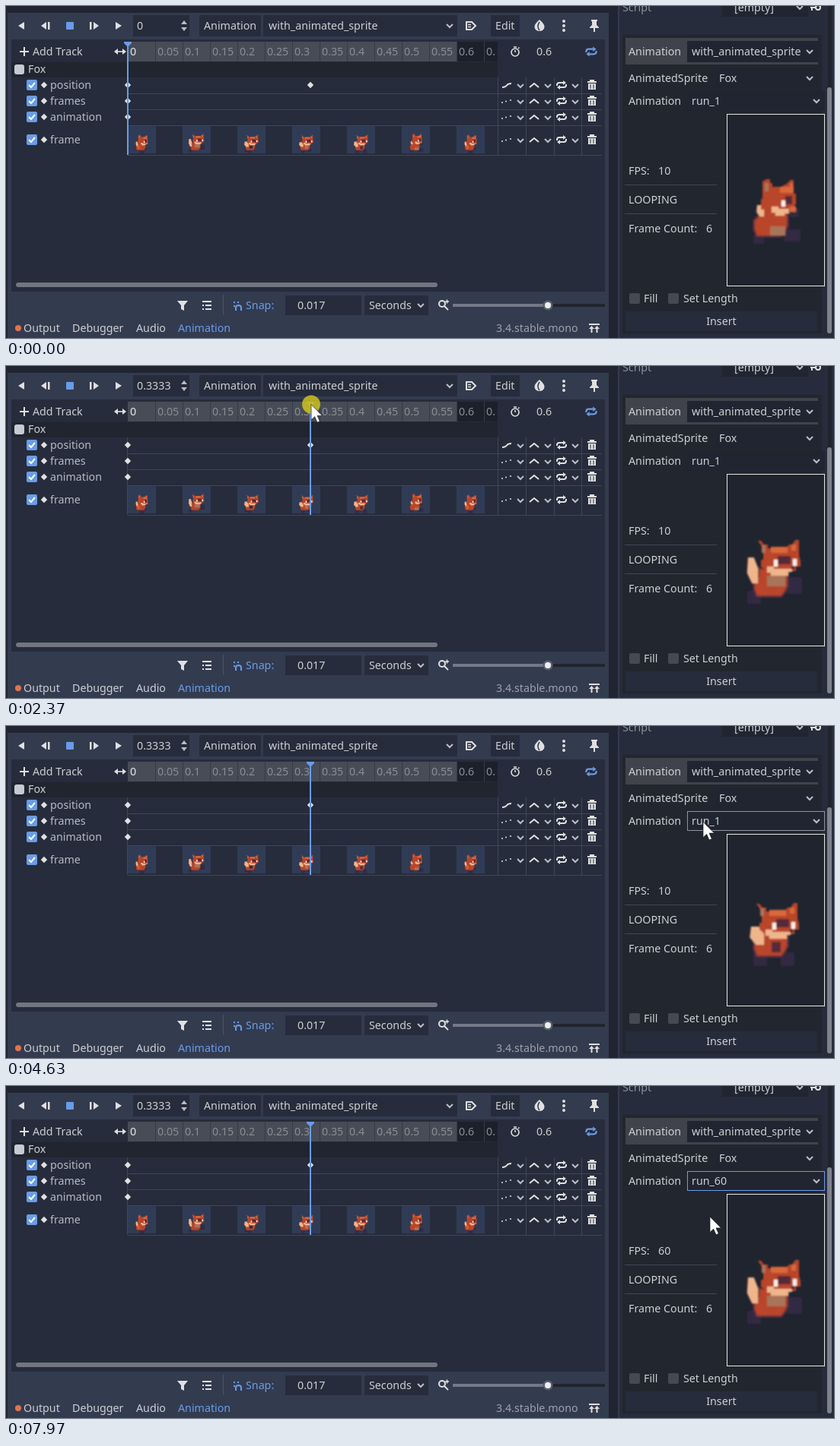
An HTML page that plays this animation: 1088 px wide and 437 px high, repeating every 7990 ms.

```html
<!DOCTYPE html>
<html lang="en">
<head>
<meta charset="utf-8">
<title>Animation editor</title>
<style>
  html, body { margin: 0; width: 100%; height: 100%; overflow: hidden; background: #202531; }
  svg { display: block; }
  text { font: 14.25px "Noto Sans", "Open Sans", sans-serif; white-space: pre; }
</style>
</head>
<body>
<svg id="stage" width="1088" height="437" viewBox="0 0 1088 437"></svg>
<script>
const LOOP = 7990;
const BASE = '#333b4f', DARK = '#262c3b', DARKER = '#202531', LINE = '#3f4656';
const ICON = '#e0e0e0', TEXT = '#cdcfd2', DIM = '#8d929d', BLUE = '#699ce8';

const rect = (x, y, w, h, fill, extra = '') =>
  `<rect x="${x}" y="${y}" width="${w}" height="${h}" fill="${fill}" ${extra}/>`;
const text = (x, y, s, fill = TEXT, extra = '') => `<text x="${x}" y="${y}" fill="${fill}" ${extra}>${s}</text>`;
const shape = (d, fill = ICON) => `<path d="${d}" fill="${fill}"/>`;
const stroke = (d, color = ICON, width = 2) =>
  `<path d="${d}" fill="none" stroke="${color}" stroke-width="${width}"/>`;
const dot = (x, y, r, fill = ICON) => `<circle cx="${x}" cy="${y}" r="${r}" fill="${fill}"/>`;
const group = (id, content, extra = '') => `<g id="${id}" ${extra}>${content}</g>`;
const chevron = (x, y, color = '#b9bdc6') => stroke(`M${x - 4},${y - 2}l4,4l4,-4`, color);
const diamond = (x, y, r = 4.2) => shape(`M${x - r},${y}l${r},${-r}l${r},${r}l${-r},${r}z`);
const loopIcon = (x, y, color, s = 1) => `<g transform="translate(${x} ${y}) scale(${s})">` +
  stroke('M-6,1v-1q0,-3 3,-3h5M6,-1v1q0,3 -3,3h-5', color) +
  shape('M2,-6l4,3l-4,3zM-2,6l-4,-3l4,-3z', color) + '</g>';

function toolbar() {
  let s = rect(2, 9, 790, 428, BASE);
  s += shape('M24,21v10l-8,-5z') + shape('M53,21v10l-7,-5z') + rect(55, 21, 2.5, 10, ICON);
  s += rect(79, 21, 10, 10, BLUE, 'rx="1"');
  s += rect(110, 21, 2.5, 10, ICON) + shape('M115,21v10l7,-5z') + shape('M144,21v10l8,-5z');
  s += rect(167, 12, 74, 28, DARK) + shape('M230,24l4,-5l4,5zM230,28l4,5l4,-5z', '#b9bdc6');
  s += rect(254, 12, 81, 28, DARK) + text(260, 31, 'Animation');
  s += rect(338, 12, 255, 28, DARK) + text(345, 31, 'with_animated_sprite') + chevron(583, 26);
  s += stroke('M605,21h7l5,5l-5,5h-7z') + stroke('M607,24.5h4M607,27.5h4', ICON, 1.4);
  s += rect(637, 12, 38, 28, DARK) + text(643, 31, 'Edit');
  s += shape('M701,18q7,6 6.5,10q-1,5 -6.5,5q-5.500,0 -6.500,-5q-.5,-4 6.500,-10z') +
       stroke('M701,21q-4,6 0,11', BASE, 1.5);
  s += [20, 26, 32].map(y => dot(733, y, 2)).join('');
  s += shape('M769,18h8v2h-1v5l3,3v1h-5v5h-2v-5h-5v-1l3,-3v-5h-1z');
  return s;
}

function ruler() {
  let s = rect(7, 44, 780, 332, DARK) + rect(160, 47, 432, 26, '#484c57') + rect(592, 47, 54, 26, '#1c202a');
  s += stroke('M18,60h12M24,54v12') + text(35, 65, 'Add Track');
  s += stroke('M144,60h12', ICON, 1.6) + shape('M142,60l5,-4v8zM158,60l-5,-4v8z');
  for (let i = 0; i < 14; i++) {
    const x = 160 + 36 * i;
    if (i) s += rect(x, 47, 1, 26, '#363b47');
    const label = i === 13 ? '0.' : String(+(i * 0.05).toFixed(2));
    s += text(x + 3, 65, label, i ? '#898d95' : '#e6e7e9');
  }
  s += '<circle cx="669" cy="61" r="5" fill="none" stroke="#e0e0e0" stroke-width="1.6"/>' +
       stroke('M669,61v-3M667,54h4M673,56l1.500,-1.500', ICON, 1.5);
  return s + text(697, 65, '0.6') + loopIcon(769, 60, BLUE, 1.1);
}

function trash(y) {
  return rect(764, y - 5, 12, 2, ICON) + rect(767, y - 7, 6, 2, ICON) +
    shape(`M765,${y - 2}h10v8h-10z`) + stroke(`M768,${y - 1}v6M772,${y - 1}v6`, DARK, 1);
}

function tracks() {
  let s = rect(7, 74, 639, 20, '#20252f') + rect(11, 77, 13, 13, '#c6cad2', 'rx="3"') + text(29, 88, 'Fox');
  s += [115, 136, 157, 196].map(y => rect(160, y, 623, 1, LINE)).join('');
  s += [646, 683, 720, 756].map(x => rect(x, 94, 1, 102, LINE)).join('');
  s += rect(159, 94, 1, 102, LINE);
  ['position', 'frames', 'animation', 'frame'].forEach((name, i) => {
    const y = [104, 125, 146, 176][i];
    s += rect(27, y - 7, 14, 14, BLUE, 'rx="2"') + stroke(`M30,${y}l3,3l5,-6`, '#fff');
    s += diamond(50, y) + text(58, y + 5, name, '#b6bac2');
    s += i ? [652, 657, 663].map((x, k) => dot(x, y + 2 - k * 1.5, 1)).join('')
           : stroke(`M652,${y + 3}q4,0 6,-2.500t6,-2.500`);
    s += stroke(`M688,${y + 3}l6,-5l6,5`) + loopIcon(730, y, ICON);
    s += [676, 712, 748].map(x => chevron(x, y + 1)).join('') + trash(y);
    if (i < 3) s += diamond(160, y);
  });
  s += diamond(400, 104);
  for (let i = 0; i < 7; i++) {
    const x = 160 + 72 * i;
    s += rect(x, 158, 37, 36, '#303c55') +
      `<use href="#fox${(i + 5) % 6}" transform="translate(${x + 7} 167) scale(.29)"/>`;
  }
  return s + rect(13, 364, 554, 6, '#707580', 'rx="3"');
}

function footer() {
  let s = shape('M225,388h14l-5,6v7l-4,-2v-5z');
  s += stroke('M258,389h12M262,394h8M262,399h8') + stroke('M258,394h2M258,399h2');
  s += rect(285, 380, 1, 27, '#4b5263');
  s += stroke('M302,401v-4q0,-3 3.500,-3t3.500,3v4', BLUE) +
       [[300, 390], [305, 390], [300, 395]].map(p => dot(...p, 1.2, BLUE)).join('');
  s += text(315, 399, 'Snap:', BLUE) + rect(367, 381, 100, 26, DARK) + text(383, 399, '0.017');
  s += rect(471, 381, 84, 26, DARK) + text(477, 399, 'Seconds') + chevron(545, 394);
  s += '<circle cx="573" cy="392" r="4" fill="none" stroke="#e0e0e0" stroke-width="2"/>' +
       stroke('M576,395l5,5') + stroke('M577,389h5M579.500,386.500v5', ICON, 1.5);
  s += rect(587, 392, 125, 4, '#737986') + rect(712, 392, 75, 4, '#20252f');
  s += dot(712, 394, 6.5, '#59606f') + dot(712, 394, 4, '#f0f0f0');
  s += dot(16, 424, 4, '#e0734a') + text(23, 429, 'Output') + text(87, 429, 'Debugger');
  s += text(171, 429, 'Audio') + text(226, 429, 'Animation', BLUE) + text(644, 429, '3.4.stable.mono', '#9da1aa');
  return s + stroke('M766,419h14M769.500,430v-7M776.500,430v-7') + shape('M766,425l3.500,-4l3.500,4zM773,425l3.500,-4l3.500,4z');
}

function inspector() {
  let s = rect(804, 0, 284, 437, DARK) + rect(804, 0, 2, 437, BASE);
  s += text(810, 7, 'Script', DIM) + rect(941, 0, 113, 14, DARKER) + text(957, 7, '[empty]') + chevron(1043, 2);
  s += '<circle cx="1067" cy="2" r="3" fill="none" stroke="#e0e0e0" stroke-width="2"/>' + stroke('M1057,2h7M1059,2v4');
  s += rect(810, 38, 262, 393, '#22262f');
  s += rect(814, 42, 253, 35, '#40434c') + rect(895, 46, 172, 28, DARKER);
  s += text(818, 65, 'Animation') + text(901, 65, 'with_animated_sprite') + chevron(1056, 60);
  s += text(818, 100, 'AnimatedSprite') + rect(932, 82, 135, 26, DARKER) + text(937, 100, 'Fox') + chevron(1056, 95);
  s += text(818, 130, 'Animation') + rect(895, 112, 181, 26, DARKER);
  s += text(818, 222, 'FPS:') + rect(813, 235, 121, 1, LINE) + text(818, 260, 'LOOPING');
  s += rect(813, 273, 121, 1, LINE) + text(818, 298, 'Frame Count:') + text(920, 298, '6');
  s += [[819, 838, 'Fill'], [870, 890, 'Set Length']].map(([x, tx, label]) =>
    rect(x, 378, 14, 14, '#454952', 'rx="2"') + text(tx, 390, label)).join('');
  s += rect(814, 402, 252, 26, DARK) + text(940, 420, 'Insert', TEXT, 'text-anchor="middle"');
  s += rect(1080, 0, 5, 431, '#20242e') + rect(1079, 107, 6, 324, '#7d828c', 'rx="3"');
  return s + rect(947.5, 142.5, 128, 226, '#20242f', 'stroke="#e8e8e0"');
}

// Fox: side or front head, tail, belly and legs, varied per pose.
const RED = '#b9452b', ORANGE = '#d9673a', CREAM = '#efb68c', TAN = '#a9745a', SHADE = '#322b43', MAROON = '#572a38';
function frontHead() {
  return shape('M18,6h4l4,5h5v5h24l4,-5h4l4,-6h5v20l2,8v7h-6v6h-38l-8,-6v-9h3v-15z', RED) +
    rect(23, 12, 5, 10, TAN) + rect(35, 14, 22, 8, ORANGE) + rect(62, 11, 6, 8, ORANGE) +
    rect(44, 26, 17, 11, MAROON) + rect(39, 31, 5, 9, '#fff3e8') + rect(64, 30, 5, 9, '#fff3e8') +
    shape('M30,40h9v3h24v4h-5v5h-23v-4h-5z', CREAM) + rect(62, 39, 4, 5, MAROON);
}
function sideHead() {
  return shape('M24,7l5,-3h5v5h3v5h11l8,-4l5,-5h4v18h3v13l-4,8h-42v-14h2z', RED) +
    rect(27, 9, 5, 11, TAN) + rect(47, 14, 18, 8, ORANGE) + rect(60, 9, 4, 12, ORANGE) +
    rect(54, 26, 9, 11, MAROON) + rect(49, 32, 5, 8, '#fff3e8') +
    shape('M36,40h9v3h14v6h-6v3h-12v-4h-5z', CREAM) + rect(60, 40, 8, 7, ORANGE);
}
function fox({ front, x = 0, y = 0, tail, belly, legs }) {
  const body = 'M18,42h40v24l-4,8l-5,6h-33l-4,-10v-12l6,-6z';
  const [tx, ty, tw, th] = tail;
  const head = `<g transform="translate(${x} ${y})">${front ? frontHead() : sideHead()}</g>`;
  return legs.map(([lx, ly, w, h]) => rect(lx, ly, w, h, SHADE, 'rx="3"')).join('') +
    `<path d="${body}" fill="${RED}" stroke="${SHADE}" stroke-width="4" stroke-opacity=".55"/>` +
    shape(`M${tx},${ty}h${tw * .6}l${tw * .4},${th * .4}v${th * .6}h${-tw * .6}l${-tw * .5},${-th * .4}z`, CREAM) +
    rect(...belly) + head;
}
const poses = [
  { front: true, tail: [5, 28, 13, 34], belly: [30, 52, 24, 14, TAN], legs: [[4, 72, 18, 17], [56, 54, 20, 22]] },
  { front: true, x: -2, y: 4, tail: [9, 40, 18, 24], belly: [31, 58, 14, 13, SHADE], legs: [[8, 70, 18, 16], [24, 78, 16, 13]] },
  { front: true, x: -2, y: 5, tail: [9, 42, 17, 22], belly: [34, 58, 14, 14, TAN], legs: [[18, 76, 16, 15], [44, 72, 18, 15]] },
  { front: true, x: -2, y: 4, tail: [9, 40, 17, 24], belly: [36, 60, 12, 14, MAROON], legs: [[12, 74, 18, 18], [48, 74, 18, 18]] },
  { front: false, tail: [17, 38, 9, 15], belly: [34, 66, 20, 12, TAN], legs: [[12, 76, 14, 13], [52, 70, 22, 16], [60, 42, 12, 12]] },
  { front: false, x: -1, y: 5, tail: [13, 40, 9, 20], belly: [22, 58, 7, 15, ORANGE], legs: [[28, 76, 22, 17], [48, 66, 14, 12]] }
];

const popup = rect(895.5, 138.500, 180, 56, BASE, 'stroke="#4a6590"') +
  rect(899, 144, 173, 23, '#252b38', 'id="hover"') +
  dot(911, 155, 6.5, '#dfe6f2') + dot(911, 155, 3, BLUE) + dot(911, 178, 6.5, '#525866') +
  text(923, 160, 'run_1') + text(923, 183, 'run_60');
const pointer = '<path d="M0,0v20.500l4.700,-4.300l3.300,7.600l3.400,-1.500l-3.300,-7.400h6.500z" fill="#fff" stroke="#15181f" stroke-width=".7"/>';

document.getElementById('stage').innerHTML =
  '<defs>' + poses.map((p, i) => group('fox' + i, fox(p))).join('') +
  '<filter id="soft"><feGaussianBlur stdDeviation=".9"/></filter></defs>' +
  rect(0, 0, 1088, 437, DARKER) + toolbar() + ruler() + tracks() + footer() + inspector() +
  text(172, 31, '0', TEXT, 'id="time"') +
  group('playhead', rect(-1, 47, 2, 149, BLUE) + shape('M-5,47h10v2l-4,4h-2l-4,-4z', BLUE)) +
  '<use id="fox" transform="translate(970 224)" filter="url(#soft)"/>' +
  rect(895.5, 112.5, 180, 25, 'none', 'id="focus"') + text(901, 130, 'run_1', TEXT, 'id="choice"') +
  group('arrow', chevron(1065, 125)) + text(857, 222, '10', TEXT, 'id="fps"') +
  group('popup', popup) +
  group('cursor', group('press', dot(0, 0, 12, '#c8bd20'), 'opacity=".88"') + pointer);

const SEEK = 2260, HOVER = 4185, OPEN = 5450, CLOSE = 7440;
const presses = [[SEEK, 2470], [5400, 5560], [7240, CLOSE]];
// time, x, y
const path = [
  [60, 402, 445], [450, 335, 250], [850, 281, 106], [1150, 225, 80], [1420, 201.5, 65], [1640, 262, 53],
  [1820, 350, 51], [2050, 401, 50.5], [2900, 401, 50.5], [3340, 633, 63], [3440, 634, 64], [3860, 816, 86],
  [4230, 908, 125], [4400, 916, 126], [5860, 916, 127], [6120, 916, 150], [6240, 916, 150], [6580, 925, 172]
];
function cursorAt(t) {
  const next = path.findIndex(p => p[0] > t);
  if (next < 1) return path[next < 0 ? path.length - 1 : 0].slice(1);
  const [a, b] = [path[next - 1], path[next]];
  const k = (t - a[0]) / (b[0] - a[0]);
  return [a[1] + (b[1] - a[1]) * k, a[2] + (b[2] - a[2]) * k];
}
function poseAt(t) {
  const step = t < SEEK ? 5 + Math.floor((t - 60) / 115)
    : t < CLOSE ? Math.floor((t - 2365) / 107.6) : Math.floor((t - 7965) / 22.5);
  return ((step % 6) + 6) % 6;
}

const $ = id => document.getElementById(id);
const set = (id, name, value) => $(id).setAttribute(name, value);
const show = (id, visible) => set(id, 'visibility', visible ? 'visible' : 'hidden');
const label = (id, value) => { if ($(id).textContent !== value) $(id).textContent = value; };

function draw(t) {
  const [x, y] = cursorAt(t);
  const sought = t >= SEEK, open = t >= OPEN && t < CLOSE, done = t >= CLOSE;
  set('cursor', 'transform', `translate(${x.toFixed(1)} ${y.toFixed(1)})`);
  show('press', presses.some(([a, b]) => t >= a && t < b));
  set('playhead', 'transform', `translate(${sought ? 400 : 160} 0)`);
  label('time', sought ? '0.3333' : '0');
  set('fox', 'href', '#fox' + poseAt(t));
  set('focus', 'stroke', t >= OPEN ? BLUE : t >= HOVER ? '#8d929d' : 'none');
  label('choice', done ? 'run_60' : 'run_1');
  set('choice', 'fill', open ? BLUE : TEXT);
  set('arrow', 'opacity', open ? 0.7 : 1);
  label('fps', done ? '60' : '10');
  set('popup', 'display', open ? 'inline' : 'none');
  set('hover', 'y', y < 167 ? 144 : 167);
  set('hover', 'opacity', y < 144 ? 0 : 1);
}

const start = performance.now();
function tick() {
  draw((performance.now() - start) % LOOP);
  requestAnimationFrame(tick);
}
tick();
</script>
</body>
</html>
```
